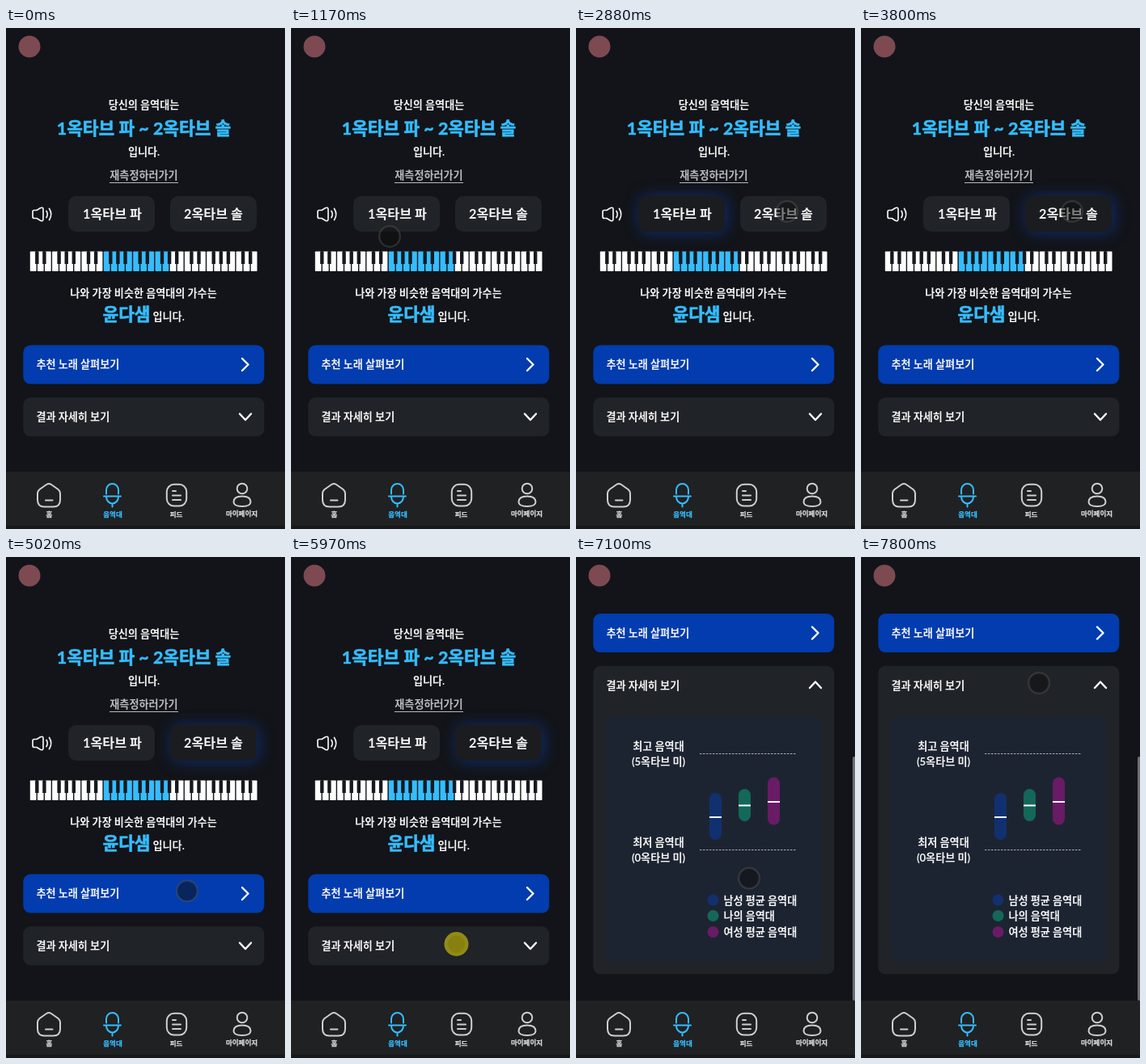
Write an HTML page that moves like this. It is 345 px wide and 620 px high and loops after 8 s.

```html
<!DOCTYPE html>
<html lang="ko">
<head>
<meta charset="utf-8">
<style>
  html, body { margin: 0; width: 100%; height: 100%; overflow: hidden; background: #121419; }
  svg { display: block; width: 345px; height: 620px; }
  text { font: 700 13.1px Lato, "Noto Sans CJK KR", "Noto Sans CJK", sans-serif; fill: #f3f3f3; }
  .mid { text-anchor: middle; }
  .big { font-size: 21.4px; fill: #35bdff; stroke: #35bdff; stroke-width: .6; }
  .note { font-size: 16.2px; }
  .link { fill: #b9babd; }
  .tab { font-size: 8.5px; fill: #d6d6d6; stroke: #d6d6d6; stroke-width: .25; }
  .icon { fill: none; stroke: #cfcfcf; stroke-width: 2; stroke-linecap: round; stroke-linejoin: round; }
  .arrow { stroke: #fff; stroke-width: 2.4; }
  .sound { stroke: #f3f3f3; stroke-width: 1.7; }
  .on { stroke: #35bdff; }
  .tab.on { fill: #35bdff; }
  .btn { fill: #202328; }
  .btn.lit { fill: #1a1c1f; filter: drop-shadow(2px 1px 9px rgba(13, 65, 190, .55)); }
</style>
</head>
<body>
<svg viewBox="0 0 345 620">
  <circle cx="29" cy="23" r="13.5" fill="#7d4a52"/>

  <g id="summary">
    <text class="mid" x="170.5" y="99.5">당신의 음역대는</text>
    <text class="mid big" x="170.5" y="132">1옥타브 파 ~ 2옥타브 솔</text>
    <text class="mid" x="170.5" y="157.5">입니다.</text>
    <text class="mid link" x="170.5" y="187">재측정하러가기</text>
    <path d="M128 191.5h85" stroke="#b9babd"/>
    <g class="icon sound">
      <path d="M33 227.500q0-2 2-2h3l4.500-2.800q3.500-1.500 3.500 2v11.600q0 3.500-3.500 2l-4.500-2.800h-3q-2 0-2-2z"/>
      <path d="M50 226.500q2.500 4 0 8M53.500 223.500q4.500 7 0 14"/>
    </g>
    <rect class="btn" id="low" x="77" y="208" width="107" height="44" rx="10"/>
    <rect class="btn" id="high" x="203" y="208" width="107" height="44" rx="10"/>
    <text class="mid note" x="131.5" y="235.5">1옥타브 파</text>
    <text class="mid note" x="256.5" y="235.5">2옥타브 솔</text>
    <g id="piano"></g>
    <text class="mid" x="170" y="333">나와 가장 비슷한 음역대의 가수는</text>
    <text class="big" x="178.5" y="362" text-anchor="end">윤다샘</text>
    <text x="181.5" y="361.5">입니다.</text>
  </g>

  <g id="rows">
    <rect x="21.3" y="392.6" width="298" height="48" rx="9" fill="#023cae"/>
    <text x="37.5" y="421.3">추천 노래 살펴보기</text>
    <path class="icon arrow" d="M292 409l7.500 7.500l-7.500 7.500"/>
    <rect class="btn" id="panel" x="21.3" y="457.300" width="298" height="48" rx="9"/>
    <text x="37.5" y="486.300">결과 자세히 보기</text>
    <path class="icon arrow" id="fold"/>
  </g>

  <g id="detail">
    <rect x="37" y="198" width="266" height="302" rx="8" fill="#1d2431"/>
    <text class="mid" x="102" y="238.500">최고 음역대</text>
    <text class="mid" x="102" y="258">(5옥타브 미)</text>
    <text class="mid" x="102" y="357.500">최저 음역대</text>
    <text class="mid" x="102" y="376.500">(0옥타브 미)</text>
    <path d="M153 243.500h120M153 362.500h120" stroke="#a9adb4" stroke-dasharray="2.500 1.500"/>
    <g id="chart"></g>
    <rect x="342" y="247" width="5" height="302" rx="2" fill="#6c6d70"/>
  </g>

  <rect y="549" width="345" height="67" fill="#202123"/>
  <rect y="616" width="345" height="4" fill="#18181b"/>
  <g class="icon">
    <path d="M50 565q3-2 6 0l8.500 6q2.500 2 2.500 5v8q0 8.500-8.500 8.500h-11q-8.500 0-8.500-8.500v-8q0-3 2.500-5zM49 584.500h8.500"/>
    <path class="on" d="M124 576.500v-5a7.500 7.500 0 0 1 15 0v5M121 579.500h21M124 580a7.500 8.500 0 0 0 15 0M131.500 589v3.500"/>
    <rect x="198.800" y="564.800" width="24.400" height="26.800" rx="9"/>
    <path d="M206 573h4M206 578.500h10M206 584h10"/>
    <circle cx="292" cy="570" r="6.300"/>
    <path d="M281.500 586.500c0-5.500 5.500-7 10.500-7s10.500 1.500 10.500 7c0 4-4.500 5.500-10.500 5.500s-10.500-1.500-10.500-5.500z"/>
  </g>
  <text class="mid tab" x="53.5" y="604.5">홈</text>
  <text class="mid tab on" x="132" y="604.5">음역대</text>
  <text class="mid tab" x="210.5" y="604.5">피드</text>
  <text class="mid tab" x="291.5" y="604">마이페이지</text>

  <g id="cursor">
    <circle id="idle" r="12.800" fill="rgba(14,14,14,.5)" stroke="rgba(90,90,90,.4)" stroke-width="2.400"/>
    <g id="tap">
      <circle r="15" fill="#918b16"/>
      <circle r="10.500" fill="#86800f"/>
    </g>
  </g>
</svg>
<script>
const LOOP = 8000;
const $ = id => document.getElementById(id);
const rect = (x, y, w, h, fill, r = 0) =>
  `<rect x="${x}" y="${y}" width="${w}" height="${h}" rx="${r}" fill="${fill}"/>`;

// 31 white keys from C; the sung range is keys 10 to 18
const KEY = 9.1;
let white = '', black = '';
for (let i = 0; i < 31; i++) {
  const x = 29.3 + i * KEY;
  white += rect(x + .5, 276.5, KEY - 1.4, 24.5, i > 9 && i < 19 ? '#35bdff' : '#fff', .8);
  if (![2, 6].includes(i % 7) && i < 30) black += rect(x + KEY - 2.3, 276.5, 4.4, 15.5, '#17191e');
}
$('piano').innerHTML = white + black;

// label, colour, pill x, top, bottom, mean, legend y
$('chart').innerHTML = [
  ['남성 평균 음역대', '#11306f', 165, 292, 350, 322, 424.5],
  ['나의 음역대', '#13685a', 201, 287, 327, 307.5, 444],
  ['여성 평균 음역대', '#691b66', 237, 272.5, 331.5, 303, 464],
].map(([label, color, x, top, bottom, mean, y]) =>
  rect(x, top, 15, bottom - top, color, 7.5) + rect(x, mean - 1, 15, 2, '#fff') +
  `<circle cx="169.5" cy="${y}" r="7" fill="${color}"/><text x="182.5" y="${y + 5}">${label}</text>`
).join('');

// time, x, y
const path = [
  [260, 337, 614], [410, 331, 600], [560, 331, 600], [750, 262, 485], [950, 165, 328],
  [1170, 122, 258], [1380, 118, 244], [1660, 135, 229], [2200, 135, 229], [2500, 225, 222],
  [2740, 275, 220], [2880, 261, 227], [4680, 261, 227], [4810, 250, 290], [5020, 224, 413],
  [5230, 209, 464], [5440, 204.5, 479], [6830, 204.5, 479], [7100, 214, 398],
  [7400, 219, 252], [7660, 220, 174], [7800, 220, 156], [LOOP, 220, 156],
];
const taps = [1730, 3670, 5970], HOLD = 130;

function cursorAt(t) {
  const i = path.findIndex(p => p[0] > t);
  const [t0, x0, y0] = path[i - 1], [t1, x1, y1] = path[i];
  const u = (t - t0) / (t1 - t0);
  return [x0 + (x1 - x0) * u, y0 + (y1 - y0) * u];
}

const show = (id, on) => { $(id).style.display = on ? '' : 'none'; };

function draw(now) {
  const t = now % LOOP;
  const [lowOn, highOn, open] = taps.map(tap => t >= tap + HOLD);
  const tapping = taps.some(tap => t >= tap && t < tap + HOLD);

  $('low').classList.toggle('lit', lowOn && !highOn);
  $('high').classList.toggle('lit', highOn);
  show('summary', !open);
  show('detail', open);
  $('rows').setAttribute('transform', `translate(0 ${open ? -322.5 : 0})`);
  $('panel').setAttribute('height', open ? 381.5 : 48);
  $('fold').setAttribute('d', open ? 'M289 484.5l7-7.5l7 7.5' : 'M289 477.5l7 7.5l7-7.5');

  const visible = t >= path[0][0];
  show('cursor', visible);
  if (visible) $('cursor').setAttribute('transform', `translate(${cursorAt(t)})`);
  show('idle', !tapping);
  show('tap', tapping);
}

const start = performance.now();
function tick() {
  draw(performance.now() - start);
  requestAnimationFrame(tick);
}
tick();
</script>
</body>
</html>
```
